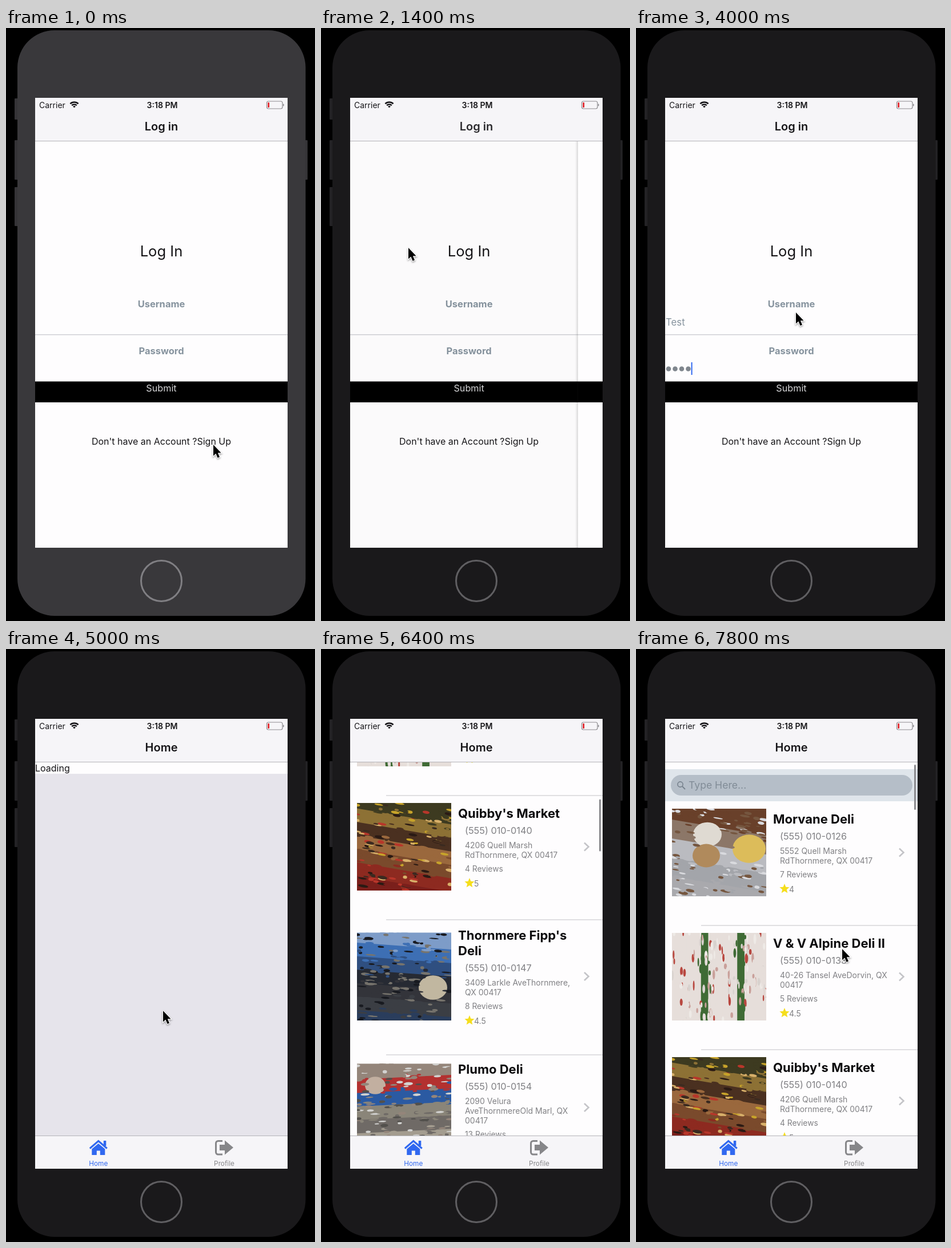
These frames come from a looping animation (541 px wide and 1036 px high, 8000 ms). An HTML page with a canvas:

```html
<!DOCTYPE html>
<html lang="en">
<head>
<meta charset="utf-8">
<title>Phone app demo</title>
<style>
html, body { margin: 0; width: 100%; height: 100%; overflow: hidden; background: #000; }
canvas { display: block; }
</style>
</head>
<body>
<canvas id="stage" width="541" height="1036"></canvas>
<script>
const ctx = document.getElementById('stage').getContext('2d');
const LOOP = 8000, STEP = 200;
const LEFT = 51, WIDTH = 442, RIGHT = LEFT + WIDTH, MID = LEFT + WIDTH / 2;
const TOP = 122, BODY = 198, TABS = 850, BOTTOM = 908;
const INK = '#151417', PAPER = '#fefdfe', BAR = '#f6f5f8', RULE = '#c3c2c8', EDGE = '#b4b3b8';
const GREY = '#808084', LABEL = '#86939e', BLUE = '#3068f0', ICON = '#868689';

// ---- motion: each stop is [arrive, leave, ...values] ----
const POINTER = [[0, 400, 363, 728], [1050, 1130, 80, 172], [1400, 1400, 153, 384], [1900, 4000, 280, 497],
  [4400, 6600, 275, 632], [7200, 7300, 276, 258], [7800, LOOP, 361, 524]];
const COVER = [[0, 250, 0], [750, 1130, 1], [1630, LOOP, 0]];
const SCROLL = [[0, 5900, 0], [6400, 6400, 432], [7200, 7300, 1311], [7800, LOOP, -12]];

const smooth = u => u * u * (3 - 2 * u);
const easeOut = u => 1 - (1 - u) ** 3;
const clamp = (v, low, high) => Math.max(low, Math.min(high, v));

function track(stops, t, ease = smooth) {
  const i = stops.findLastIndex(s => s[0] <= t);
  const [, leave, ...from] = stops[i];
  if (t <= leave || i === stops.length - 1) return from;
  const [arrive, , ...to] = stops[i + 1];
  const u = ease((t - leave) / (arrive - leave));
  return from.map((v, k) => v + (to[k] - v) * u);
}

// ---- drawing helpers ----
function rect(color, x, y, w, h, r = 0) {
  ctx.fillStyle = color;
  ctx.beginPath();
  ctx.roundRect(x, y, w, h, r);
  ctx.fill();
}
function path(points) {
  ctx.beginPath();
  for (let i = 0; i < points.length; i += 2) ctx.lineTo(points[i], points[i + 1]);
}
function poly(color, ...points) {
  path(points);
  ctx.fillStyle = color;
  ctx.fill();
}
function stroke(color, width) {
  ctx.strokeStyle = color;
  ctx.lineWidth = width;
  ctx.stroke();
}
function line(color, width, ...points) {
  path(points);
  stroke(color, width);
}
function arc(color, width, x, y, r, from = 0, to = 7) {
  ctx.beginPath();
  ctx.arc(x, y, r, from, to);
  stroke(color, width);
}
function blob(color, x, y, rx, ry = rx, turn = 0) {
  ctx.fillStyle = color;
  ctx.beginPath();
  ctx.ellipse(x, y, rx, ry, turn, 0, 7);
  ctx.fill();
}
// y is the middle of the capitals.
function text(str, x, y, size, color = INK, weight = 400, align = 'left') {
  ctx.font = `${weight} ${size}px Inter, "Open Sans", sans-serif`;
  ctx.textAlign = align;
  ctx.fillStyle = color;
  ctx.fillText(str, x, y + size * 0.36);
}
const centered = (str, x, y, size, color, weight) => text(str, x, y, size, color, weight, 'center');
function scoped(draw, { alpha = 1, x = 0, y = 0, clip } = {}) {
  ctx.save();
  ctx.globalAlpha *= alpha;
  ctx.translate(x, y);
  if (clip) {
    ctx.beginPath();
    ctx.rect(...clip);
    ctx.clip();
  }
  draw();
  ctx.restore();
}

// ---- pictures: slanted bands of colour, loosely mixed by seeded flecks ----
const PHOTO_W = 165, PHOTO_H = 153;
const menuBands = Array.from({ length: 13 }, (_, i) => i % 5 === 4 ? '#3f6b35' : '#e6deda');
const photos = {
  tray: { bands: ['#69402a', '#8c7768', '#babbc0', '#a3a5aa', '#a9a9ad'], tilt: 14, flecks: ['#d9dade', '#75563f'],
    spots: [['#dfdad2', 62, 45, 25], ['#b08a5c', 60, 82, 24], ['#dcbc5a', 135, 70, 29]] },
  menu: { bands: menuBands, across: true, flecks: ['#eeeae6', '#c9a09a', '#d8d2ce', '#b8473f'] },
  counter: { bands: ['#3d3a20', '#8d7135', '#4a3020', '#9a683d', '#7a4a2c', '#8d2a20', '#7a1f1b'], tilt: 14,
    flecks: ['#c7a32a', '#b8362a', '#2a1a14', '#d8b06a', '#3a2a20'] },
  awning: { bands: ['#7d9cc8', '#3d6fb4', '#2f4f80', '#262a33', '#33343a', '#3b3e44', '#2a3d5c'], tilt: 6,
    flecks: ['#181a20', '#77746d'], spots: [['#c1b7a0', 133, 96, 25]] },
  corner: { bands: ['#94857a', '#b33130', '#2b5aa2', '#8a8579', '#6f6a66', '#a39c8f', '#a9a6a3'], tilt: -4,
    flecks: ['#d2d2d0', '#52504c', '#94857a'], spots: [['#c2afa0', 32, 38, 18]] },
  wrap: { bands: ['#7b421f', '#8c4824', '#a9734a', '#dcd8d5'], tilt: -18, flecks: ['#c9b9a8'] },
  halves: { bands: ['#a66d43', '#d9cdb8', '#4a352b', '#cfc6a8', '#ded5c5', '#a5957c', '#b5a58d', '#4a352b', '#c4b596',
    '#a66d43', '#b5756a'], across: true, flecks: ['#c2b79c'] },
  platter: { bands: ['#7b5f52', '#a57c5f', '#9a6a45', '#6b4530', '#8a5c3b', '#b5a795', '#8b6b4b'], tilt: 2,
    flecks: ['#3b2a25', '#c3a18a', '#a26f42'], spots: [['#e5d6bc', 62, 24, 20], ['#e5d6bc', 112, 53, 22]] },
  blank: { bands: ['#c4c2c5'] }
};

function drawPhoto({ bands, tilt = 0, across, flecks = bands, spots = [] }) {
  if (across) ctx.transform(0, 1, 1, 0, 0, 0);
  const band = PHOTO_W / bands.length;
  bands.forEach((color, i) => {
    const y = i ? i * band : -PHOTO_W;
    poly(color, 0, y - tilt, PHOTO_W, y + tilt, PHOTO_W, 2 * PHOTO_W, 0, 2 * PHOTO_W);
  });
  for (const [color, x, y, r] of spots) blob(color, x, y, r, r * 0.85);
  let seed = 99;
  const random = () => (seed = seed * 16807 % 2147483647) / 2147483647;
  for (let i = 0; i < 300; i++) {
    const x = random() * PHOTO_W, y = random() * PHOTO_W;
    const slant = tilt * (2 * x / PHOTO_W - 1);
    const near = clamp(Math.floor((y - slant) / band + random() - 0.5), 0, bands.length - 1);
    const color = i % 3 ? bands[near] : flecks[i / 3 % flecks.length];
    const covered = spots.some(([, sx, sy, r]) => Math.hypot(x - sx, y - sy) < r);
    if (!covered) blob(color, x, y, 3 + random() * 6, 1 + random() * 2, tilt / 80);
  }
}

// ---- list: "|" marks a line break ----
const row = (photo, title, address, reviews, stars) =>
  ({ photo: photos[photo], title: title.split('|'), address: address.split('|'), reviews, stars });
const rows = [
  row('tray', 'Morvane Deli', '5552 Quell Marsh|RdThornmere, QX 00417', 7, 4),
  row('menu', 'V & V Alpine Deli II', '40-26 Tansel AveDorvin, QX|00417', 5, 4.5),
  row('counter', "Quibby's Market", '4206 Quell Marsh|RdThornmere, QX 00417', 4, 5),
  row('awning', "Thornmere Fipp's|Deli", '3409 Larkle AveThornmere,|QX 00417', 8, 4.5),
  row('corner', 'Plumo Deli', '2090 Velura|AveThornmereOld Marl, QX|00417', 13, 4),
  row('wrap', 'Marlop Brothers|Corner', '2815 Larkle AveThornmere,|QX 00417', 7, 4.5),
  row('halves', 'Brellin Deli', '2047 Brellin AveGadwick,|QX 00417', 3, 3.5),
  row('platter', "Quorm's Deli", '5922 Umber StHollow Marl,|QX 00423', 12, 4.5),
  row('blank', '87 Strand Grocery', '5240 Tansel AveThornmere,|QX 00417', 1, 4)
];
rows.forEach((item, i) => {
  item.phone = `(555) 010-01${26 + 7 * i}`;
  item.height = 217 + 19 * (item.title.length - 1) + 5 * (item.address.length - 2);
});

function star(x, y) {
  const points = Array.from({ length: 10 }, (_, i) => {
    const a = i * Math.PI / 5 - Math.PI / 2, r = i % 2 ? 4 : 9;
    return [x + r * Math.cos(a), y + r * Math.sin(a)];
  });
  poly('#f5de1c', ...points.flat());
}

function drawRow(item, top) {
  const middle = top + (item.height - 38) / 2;
  scoped(() => drawPhoto(item.photo), { x: 63, y: middle - PHOTO_H / 2, clip: [0, 0, PHOTO_W, PHOTO_H] });
  const moreTitle = 27 * (item.title.length - 1), moreAddress = 17 * (item.address.length - 1);
  let y = middle - 49.5 - (moreTitle + moreAddress) / 2;
  item.title.forEach((s, i) => text(s, 240, y + 27 * i, 22, '#0b0a0c', 700));
  text(item.phone, 252, y += moreTitle + 30, 16.3, GREY);
  y += 25.5;
  item.address.forEach((s, i) => text(s, 252, y + 17 * i, 14, GREY));
  text(item.reviews + ' Reviews', 252, y += moreAddress + 24.5, 13.8, GREY);
  y += 25.5;
  star(260, y - 1);
  text(item.stars, 268, y, 14, GREY);
  line('#c4c4c8', 2.6, 461, middle - 7, 468.5, middle, 461, middle + 7);
  rect(RULE, 114, top + item.height - 0.5, RIGHT - 114, 1);
}

function drawList(scroll, moving) {
  rect(PAPER, LEFT, BODY, WIDTH, TABS - BODY);
  let y = BODY - scroll;
  rect('#dfe5eb', LEFT, y, WIDTH, 56);
  rect('#b5bec8', LEFT + 10, y + 10, WIDTH - 19, 36, 18);
  arc('#77828d', 1.6, 77.5, y + 26.5, 4.6);
  line('#77828d', 1.8, 81, y + 30, 86, y + 35);
  text('Type Here...', 92, y + 28, 17.6, '#818c97');
  y += 56;
  for (const item of rows) {
    if (y < TABS && y + item.height > BODY) drawRow(item, y);
    y += item.height;
  }
  if (moving) rect('#8b8b8f', RIGHT - 6, BODY + 4 + Math.max(0, scroll) * 0.14, 3, 91 + Math.min(0, scroll), 1.5);
}

// ---- screens ----
function drawHeader(title, alpha = 1) {
  rect(BAR, LEFT, TOP, WIDTH, BODY - TOP);
  rect(EDGE, LEFT, BODY - 1, WIDTH, 1);
  scoped(() => centered(title, MID, 171.5, 20, INK, 600), { alpha });
  text('Carrier', 58, 134.5, 14);
  centered('3:18 PM', 273.5, 134.5, 14.1, INK, 600);
  for (const r of [10, 6, 2]) arc(INK, 2.6, 119.5, 139.5, r, -Math.PI * 0.75, -Math.PI * 0.25);
  ctx.beginPath();
  ctx.roundRect(456.5, 128, 27.5, 13, 3);
  stroke('#8d8c90', 1.2);
  rect('#8d8c90', 485, 132.5, 1.6, 4, 1);
  rect('#e0242b', 458.3, 130, 2.8, 9, 1);
}

function drawForm(heading, foot, name = '', dots = 0, caret = '') {
  rect(PAPER, LEFT, BODY, WIDTH, BOTTOM - BODY);
  centered(heading, MID, 390, 25.6);
  centered('Username', MID, 482.5, 16.5, LABEL, 700);
  centered('Password', MID, 564.5, 16.5, LABEL, 700);
  text(name, LEFT + 1, 514, 16.8, LABEL);
  const nameEnd = LEFT + 2 + ctx.measureText(name).width;
  for (let i = 0; i < dots; i++) blob('#7f868d', 57 + 11.5 * i, 595.5, 4.3);
  if (caret === 'name') rect(BLUE, nameEnd, 503, 2, 22);
  if (caret === 'word') rect(BLUE, LEFT + 11.4 * dots, 584, 2, 22);
  rect('#d0d0d5', LEFT, 535, WIDTH, 1.5);
  rect('#000', LEFT, 617.5, WIDTH, 36.5);
  centered('Submit', MID, 629, 16.2, '#d6d6d8');
  centered(foot, MID, 722.5, 16);
}

function drawLogin(t) {
  const [cover] = track(COVER, t, easeOut);
  const typed = from => clamp(Math.floor((t - from) / 150) + 1, 0, 4);
  const caret = t < 2200 ? '' : t < 3200 ? 'name' : 'word';
  scoped(() => drawForm('Log In', "Don't have an Account ?Sign Up", 'Test'.slice(0, typed(2600)), typed(3350), caret),
    { x: -0.3 * WIDTH * cover });
  if (cover) {
    const edge = LEFT + WIDTH * (1 - cover), height = BOTTOM - BODY;
    scoped(() => rect('#000', LEFT, BODY, WIDTH, height), { alpha: 0.12 * cover });
    const shade = ctx.createLinearGradient(edge - 5, 0, edge, 0);
    shade.addColorStop(0, '#0000');
    shade.addColorStop(1, '#0002');
    rect(shade, edge - 5, BODY, 5, height);
    scoped(() => drawForm('Sign Up', ''), { x: edge - LEFT });
  }
  drawHeader('Log in', 1 - cover);
  scoped(() => {
    centered('Sign Up', MID, 171.5, 20, INK, 600);
    line('#087bff', 3, 71, 162, 62, 171.5, 71, 181);
    text('Log in', 78, 171.5, 20, '#087bff');
  }, { alpha: cover ** 3 });
}

function drawTabs() {
  rect(BAR, LEFT, TABS, WIDTH, BOTTOM - TABS);
  rect(EDGE, LEFT, TABS, WIDTH, 1);
  scoped(() => {
    rect(BLUE, 9, -12, 4.5, 9);
    line(BLUE, 3, -15, 1.5, 0, -11.5, 15, 1.5);
    poly(BLUE, -11.5, 2.5, 0, -7, 11.5, 2.5, 11.5, 13, -11.5, 13);
    rect(BAR, -3, 5.5, 6, 8);
    centered('Home', 0, 28, 11.8, BLUE);
  }, { x: 161.8, y: 871 });
  scoped(() => {
    ctx.beginPath();
    ctx.roundRect(-14.5, -11.5, 24, 23.5, 4);
    stroke(ICON, 3);
    rect(BAR, -3, -14, 16, 28);
    rect(ICON, -8, -5, 11, 10);
    poly(ICON, 1, -12.5, 16, 0, 1, 12.5);
    centered('Profile', 0, 28, 11.8, ICON);
  }, { x: 382, y: 871 });
}

function drawHome(t) {
  if (t < 5400) {
    rect('#e6e4eb', LEFT, BODY, WIDTH, TABS - BODY);
    rect(PAPER, LEFT, BODY, WIDTH, 20);
    text('Loading', LEFT, 208.5, 16);
  } else {
    scoped(() => drawList(track(SCROLL, t)[0], t > 5900), { clip: [LEFT, BODY, WIDTH, TABS - BODY] });
  }
  drawHeader('Home');
  drawTabs();
}

function drawCase(lit) {
  const side = lit ? '#343336' : '#232225';
  rect('#000', 0, 0, 541, 1036);
  rect(side, 15, 123, 7, 37, 1);
  rect(side, 15, 278, 7, 68, 1);
  rect(side, 15, 196, 513, 69, 1);
  rect(lit ? '#39383b' : '#1a191b', 20, 4, 504.5, 1023, 65);
  arc(lit ? '#807f83' : '#605f62', 3, MID, 966, 35.5);
}

function drawPointer(x, y) {
  const arrow = [0, 0, 0, 19.5, 4.4, 15.4, 7.6, 23, 11, 21.5, 7.9, 14.2, 13.6, 14.2, 0, 0];
  scoped(() => {
    ctx.shadowColor = '#0006';
    ctx.shadowBlur = 3;
    ctx.shadowOffsetY = 1.5;
    line('#fff', 2.4, ...arrow);
    ctx.shadowColor = 'transparent';
    poly('#000', ...arrow);
  }, { x, y });
}

function draw(now) {
  const t = Math.floor(now % LOOP / STEP) * STEP;
  drawCase(t < STEP);
  scoped(() => (t < 4700 ? drawLogin : drawHome)(t), { clip: [LEFT, TOP, WIDTH, BOTTOM - TOP] });
  if (t < 6100 || t > 6500) drawPointer(...track(POINTER, t));
  requestAnimationFrame(time => draw(Math.max(0, time - start)));
}
const start = performance.now();
draw(0);
</script>
</body>
</html>
```
